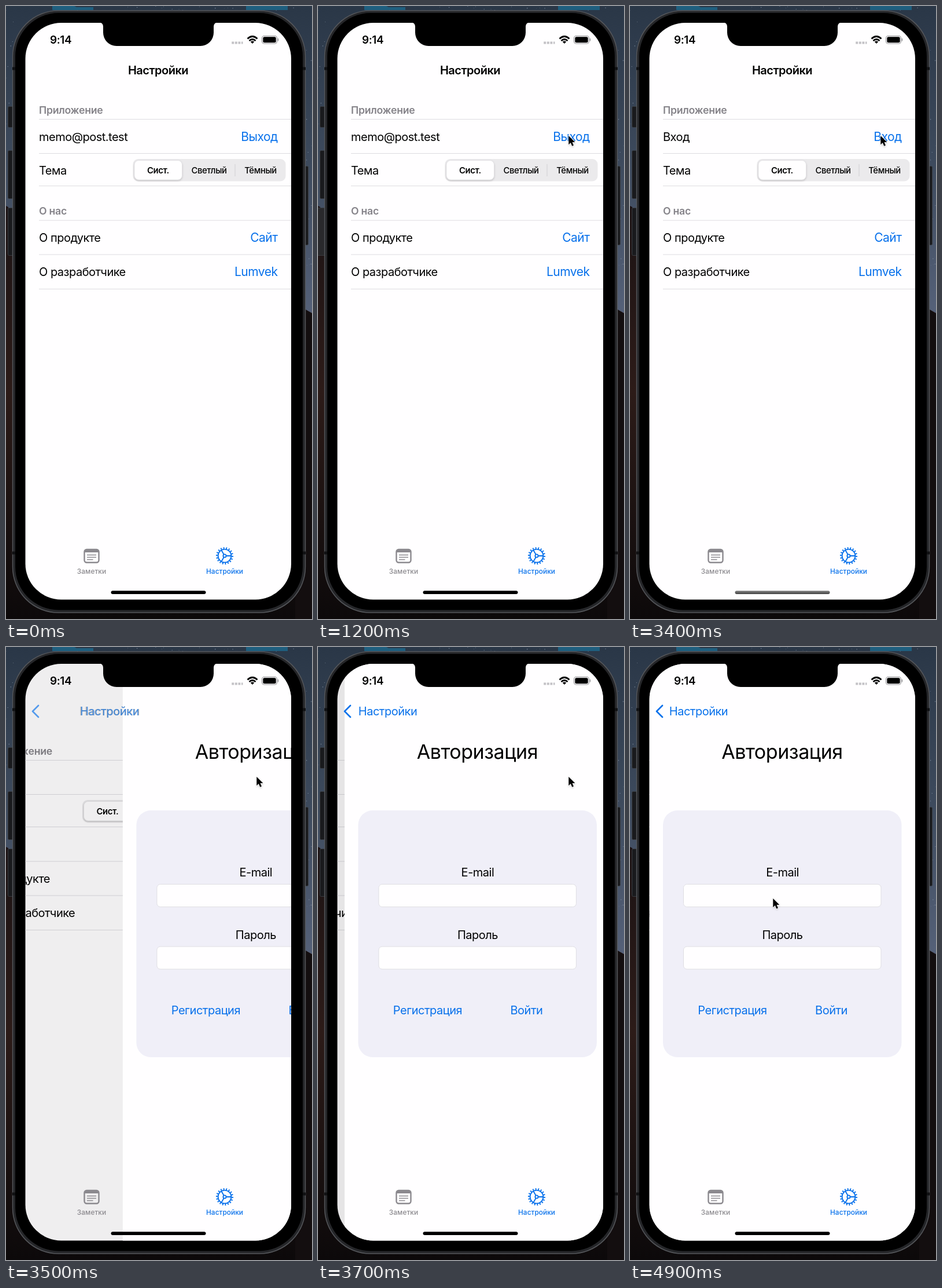
An HTML page that plays this animation: 529 px wide and 1058 px high, repeating every 5 s.

```html
<!DOCTYPE html>
<html lang="ru">
<head>
<meta charset="utf-8">
<title>Настройки</title>
<style>
html, body { margin: 0; width: 100%; height: 100%; overflow: hidden; background: #120d0e }
svg { display: block; width: 529px; height: 1058px }
text { font: 400 20px Inter, "Open Sans", sans-serif; letter-spacing: -.5px; fill: #000 }
.link { font-size: 21px; text-anchor: end }
.blue { fill: #0871eb }
.gray { fill: #8b898e }
.mid { text-anchor: middle }
.head { font-size: 17.7px; font-weight: 600; letter-spacing: -.27px; fill: #858389 }
.seg { font-size: 14.8px; font-weight: 500; letter-spacing: -.35px; text-anchor: middle }
.tab { font-size: 11.8px; font-weight: 500; letter-spacing: .08px; text-anchor: middle }
.time { font-size: 18.9px; letter-spacing: -.4px }
.big { font-size: 34px; letter-spacing: -.45px }
.bold { font-weight: 600 }
.field { fill: #fffeff; stroke: #dfdee3 }
</style>
</head>
<body>
<svg viewBox="0 0 529 1058">
  <defs>
    <linearGradient id="sky" x2="0" y2="1">
      <stop stop-color="#2a3747"/><stop offset=".5" stop-color="#3d4a5d"/><stop offset="1" stop-color="#56627a"/>
    </linearGradient>
    <linearGradient id="rock" x2="0" y2="1">
      <stop stop-color="#1c1314"/><stop offset=".45" stop-color="#2c1b18"/><stop offset="1" stop-color="#0c090a"/>
    </linearGradient>
    <linearGradient id="faded" x2="0" y2="1">
      <stop stop-color="#858585"/><stop offset="1" stop-color="#414141"/>
    </linearGradient>
    <clipPath id="screen"><rect x="33.5" y="29" width="459.5" height="995.5" rx="62"/></clipPath>
    <filter id="soft" x="-20%" y="-20%" width="140%" height="150%">
      <feDropShadow dx="0" dy="1.5" stdDeviation="1.5" flood-opacity=".2"/>
    </filter>
  </defs>

  <!-- desktop -->
  <rect width="529" height="540" fill="url(#sky)"/>
  <g id="stars" fill="#8c9bae"/>
  <path d="M0 345 4 347 5 400 11 430 60 470 460 500 518 524 529 530V1058H0Z" fill="url(#rock)"/>
  <path d="M500 520 518 524 529 531V1058H500Z" fill="#130e0f"/>
  <path d="M80 0H118L122 2H151V7H80ZM415 0H487V7H415Z" fill="#1f5f7f"/>

  <!-- phone -->
  <g fill="#191a1d" stroke="#393c41">
    <rect x="3.5" y="173.5" width="12" height="36" rx="2"/>
    <rect x="3.5" y="249.5" width="12" height="83" rx="2"/>
    <rect id="volume" y="348.5" height="82" rx="2"/>
    <rect x="510" y="276.5" width="12.5" height="136" rx="2"/>
  </g>
  <rect x="11.5" y="8" width="506" height="1039" rx="79" fill="#252629" stroke="#55575b" stroke-width="1.5"/>
  <path d="M11 108H17M512 108H518M11 944H17M512 944H518" stroke="#101113" stroke-width="5"/>
  <rect x="16" y="12" width="497" height="1030.5" rx="75"/>

  <g clip-path="url(#screen)">
    <rect x="33" y="29" width="460" height="996" fill="#fffeff"/>
    <g id="home">
      <text class="head" x="57" y="185.5">Приложение</text>
      <text id="account" x="57" y="232.5"></text>
      <text id="action" class="link blue" x="469.5" y="232.5"></text>
      <text x="57" y="290.5">Тема</text>
      <rect x="219.5" y="264" width="264" height="38.5" rx="9" fill="#ebeaec"/>
      <rect x="222" y="266.5" width="82.5" height="33.5" rx="7.5" fill="#fffeff" stroke="#dedde0" stroke-width=".7" filter="url(#soft)"/>
      <path d="M396 273V294" stroke="#cfced3"/>
      <text class="seg bold" x="263" y="288.5">Сист.</text>
      <text class="seg" x="351" y="288.5">Светлый</text>
      <text class="seg" x="440" y="288.5">Тёмный</text>
      <text class="head" x="57" y="359.5">О нас</text>
      <text x="57" y="406.5">О продукте</text>
      <text class="link blue" x="469.5" y="406.5">Сайт</text>
      <text x="57" y="466">О разработчике</text>
      <text class="link blue" x="469.5" y="466">Lumvek</text>
      <path d="M57 195.5H493M57 254.5H493M57 310.5H493M57 370H493M57 429H493M57 488.5H493" stroke="#dddce0"/>
    </g>
    <rect id="dim" x="33" y="29" width="460" height="996"/>
    <g id="login">
      <rect x="33.5" y="29" width="460" height="996" fill="#fffeff"/>
      <text class="big mid" x="263" y="193">Авторизация</text>
      <rect x="57" y="282" width="412.5" height="426" rx="25" fill="#f0eff8"/>
      <text class="mid" x="263.5" y="396">E-mail</text>
      <rect class="field" x="92.5" y="409.5" width="341.5" height="39" rx="6"/>
      <text class="mid" x="263.5" y="503.5">Пароль</text>
      <rect class="field" x="92.5" y="517" width="341.5" height="39" rx="6"/>
      <text class="blue mid" x="177" y="634">Регистрация</text>
      <text class="blue mid" x="348" y="634">Войти</text>
    </g>

    <!-- navigation bar -->
    <text id="title" class="mid bold" y="118">Настройки</text>
    <g id="back">
      <path d="M56 101 46 111 56 121" fill="none" stroke="#0871eb" stroke-width="2.7" stroke-linecap="round" stroke-linejoin="round"/>
      <text id="backLabel" class="mid blue" y="118">Настройки</text>
    </g>

    <!-- tab bar -->
    <g fill="none" stroke="#8b898e" stroke-width="2.4">
      <rect x="135.5" y="938" width="25" height="22.5" rx="4"/>
      <path d="M136 940.5H160" stroke-width="5"/>
      <path d="M140 947.5H156M140 951.5H156M140 955.5H150.5" stroke-width="1.5"/>
    </g>
    <text class="tab gray" x="148" y="979.5">Заметки</text>
    <g transform="translate(378 949)" fill="none" stroke="#0871eb" stroke-width="1.9">
      <circle r="11.4"/>
      <circle r="13.6" stroke-width="2.8" pathLength="36" stroke-dasharray=".8 1.2"/>
      <circle r="2.6"/>
      <path d="M2.6 0H11M-1.3 -2.3-5.5 -9.5M-1.3 2.3-5.5 9.5"/>
    </g>
    <text class="tab blue" x="378" y="979.5">Настройки</text>
    <rect id="bar" x="181.5" y="1009.2" width="164" height="5.8" rx="2.9"/>

    <!-- status bar -->
    <path d="M161 28Q168 29 168 36V46A23 23 0 0 0 191 69H336A23 23 0 0 0 359 46V36Q359 29 366 28Z"/>
    <text class="time bold" x="76" y="65">9:14</text>
    <path d="M390.2 63.5H409.5" stroke="#c3c2c6" stroke-width="4" stroke-dasharray="4 1.6"/>
    <g fill="none" stroke="#000" stroke-width="2.7">
      <path d="M417.5 56.5Q426 48.5 434.5 56.5M420.5 60Q426 55 431.5 60"/>
      <path d="M422.8 61.8Q426 59.4 429.2 61.8L426 65Z" fill="#000" stroke="none"/>
      <rect x="442.5" y="51.5" width="26" height="13.5" rx="4" stroke="#98979b" stroke-width="1.2"/>
      <rect x="444.3" y="53.3" width="22.4" height="9.9" rx="2.5" fill="#000" stroke="none"/>
      <path d="M470.5 56V60.5" stroke="#98979b" stroke-width="1.5"/>
    </g>
  </g>

  <g id="cursor">
    <path d="M0 0V16.5L3.8 13 6.5 19.3 9.4 18 6.8 12H12Z" transform="translate(.3 2) scale(.92)" stroke="#fff" stroke-width="1.3" paint-order="stroke" filter="url(#soft)"/>
  </g>
</svg>
<script>
const $ = id => document.getElementById(id);
const set = (id, attrs) => { for (const k in attrs) $(id).setAttribute(k, attrs[k]); };
const mix = (a, b, k) => a.map((v, i) => v + (b[i] - v) * k);
const field = [247, 432], button = [433, 222];

let seed = 7;
const random = () => (seed = seed * 16807 % 2147483647) / 2147483647;
for (let i = 0; i < 60; i++) {
  const x = i % 3 ? (i % 3 - 1) * 515 + random() * 14 : random() * 529;
  const y = i % 3 ? random() * 500 : random() * 8;
  $('stars').innerHTML += `<circle cx="${x}" cy="${y}" r="${.3 + random() * .4}"/>`;
}

// The picture advances in steps of 100 ms.
function pointer(n) {
  if (n >= 1 && n < 6) return mix(field, [75, 396], (n - 1) / 4);
  if (n < 10) return null;
  if (n < 12) return mix([9, 386], button, (n - 10) / 2);
  if (n < 47) return button;
  return mix(button, field, [.12, .6, 1][n - 47]);
}

function draw(n) {
  const pushed = n >= 35, signedIn = n < 18;
  const slide = pushed ? .366 * .272 ** (n - 35) : 1;
  const nav = pushed ? .419 * .183 ** (n - 35) : 1;

  set('home', { transform: `translate(${-138 * (1 - slide)} 0)` });
  set('dim', { opacity: .1 * (1 - slide) });
  set('login', { transform: `translate(${460 * slide} 0)` });

  const center = 118.5 + 144.5 * nav;
  set('title', { x: center, opacity: pushed ? nav * .6 : 1 });
  set('backLabel', { x: center });
  set('back', { opacity: pushed ? 1 - nav * .8 : 0 });

  $('account').textContent = signedIn ? 'memo@post.test' : 'Вход';
  $('action').textContent = signedIn ? 'Выход' : 'Вход';
  set('action', { opacity: n === 17 ? .3 : 1 });
  set('bar', { fill: n >= 17 && n < 35 ? 'url(#faded)' : '#000' });

  const hover = n >= 10 && n < 17;
  set('volume', { x: hover ? -2 : 3.5, width: hover ? 18 : 12, fill: hover ? '#29292c' : '#191a1d' });

  const at = pointer(n);
  set('cursor', { visibility: at ? 'visible' : 'hidden', transform: `translate(${at || '0 0'})` });
}

function tick() {
  draw(Math.floor(performance.now() % 5000 / 100));
  requestAnimationFrame(tick);
}
tick();
</script>
</body>
</html>
```
